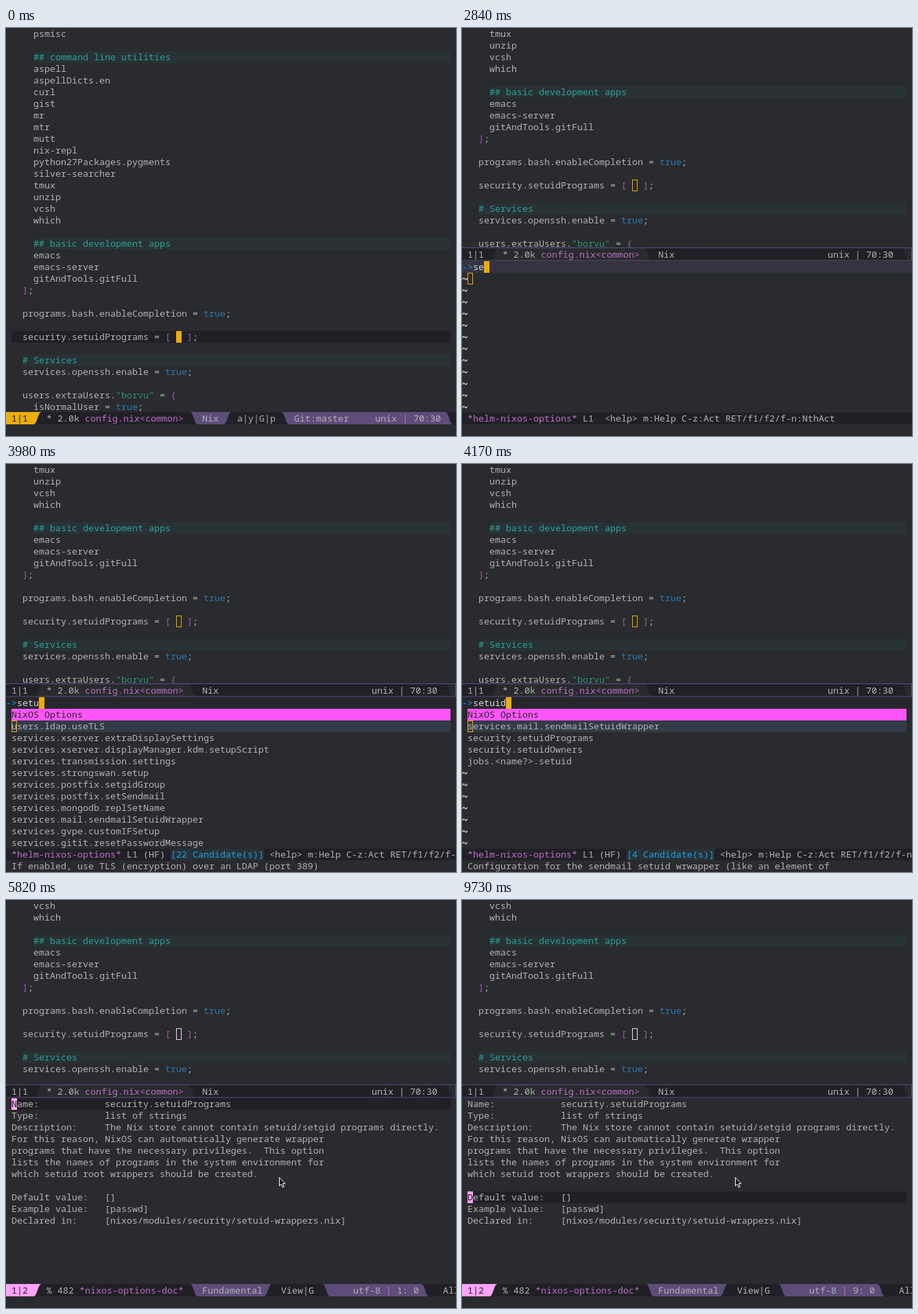
An HTML page that plays this animation: 656x595 px, repeating every 9870 ms.

```html
<!DOCTYPE html>
<html lang="en">
<head>
<meta charset="utf-8">
<title>Editor session</title>
<style>
html, body { margin: 0; width: 100%; height: 100%; overflow: hidden; background: #292b2e; }
svg { display: block; }
text { font: 13.3333px "Noto Sans Mono", "DejaVu Sans Mono", monospace; white-space: pre; }
</style>
</head>
<body>
<svg id="stage" width="656" height="595" viewBox="0 0 656 595"></svg>
<script>
const W = 656, LOOP = 9870, ROW = 17;
const BG = '#292b2e', DARK = '#212026', FG = '#b2b2b2', PURPLE = '#5d4d7a', VIOLET = '#bc6ec5',
  YELLOW = '#eead0e', PINK = '#ffa3fa', TEAL = '#2aa198', BAND = '#293235', BLUE = '#1aa0ea';

const CONFIG = `  psmisc

  ## command line utilities
  aspell
  aspellDicts.en
  curl
  gist
  mr
  mtr
  mutt
  nix-repl
  python27Packages.pygments
  silver-searcher
  tmux
  unzip
  vcsh
  which

  ## basic development apps
  emacs
  emacs-server
  gitAndTools.gitFull
];

programs.bash.enableCompletion = true;

security.setuidPrograms = [   ];

# Services
services.openssh.enable = true;

users.extraUsers."borvu" = {
  isNormalUser = true;`.split('\n');
const CURSOR_LINE = 26;

const SET_LIST = `users.ldap.useTLS
services.xserver.extraDisplaySettings
services.xserver.displayManager.kdm.setupScript
services.transmission.settings
services.strongswan.setup
services.postfix.setgidGroup
services.postfix.setSendmail
services.mongodb.replSetName
services.mail.sendmailSetuidWrapper
services.gvpe.customIFSetup
services.gitit.resetPasswordMessage`.split('\n');
const SETUID_LIST = `services.mail.sendmailSetuidWrapper
security.setuidPrograms
security.setuidOwners
jobs.<name?>.setuid`.split('\n');

const DOC = `Name:            security.setuidPrograms
Type:            list of strings
Description:     The Nix store cannot contain setuid/setgid programs directly.
For this reason, NixOS can automatically generate wrapper
programs that have the necessary privileges.  This option
lists the names of programs in the system environment for
which setuid root wrappers should be created.

Default value:   []
Example value:   [passwd]
Declared in:     [nixos/modules/security/setuid-wrappers.nix]`.split('\n');

// Start times of each change
const KEYS = [[870, 'SPC-'], [1170, 'SPC h-']];
const QUERY = [[2750, 's'], [2800, 'se'], [2860, 'set'], [3940, 'setu'], [3985, 'setui'], [4030, 'setuid']];
const LISTS = [[2920, SET_LIST], [4080, SETUID_LIST]];
const COUNTS = [[2970, 22], [4125, 4]];
const HINTS = [
  [3020, 'If enabled, use TLS (encryption) over an LDAP (port 389)'],
  [4170, 'Configuration for the sendmail setuid wrwapper (like an element of'],
  [4960, 'The Nix store cannot contain setuid/setgid programs directly.']
];
const DOWN = [8120, 8370, 8530, 8740, 8980, 9280, 9520, 9730];

const at = (steps, t, start) => steps.reduce((v, [ms, next]) => t >= ms ? next : v, start);
const esc = s => s.replace(/&/g, '&amp;').replace(/</g, '&lt;').replace(/>/g, '&gt;');
const rect = (x, y, w, h, fill) => `<rect x="${x}" y="${y}" width="${w}" height="${h}" fill="${fill}"/>`;
const text = (x, y, s, fill = FG, bold) =>
  `<text x="${x}" y="${y}" fill="${fill}"${bold ? ' font-weight="700"' : ''} xml:space="preserve">${esc(s)}</text>`;
const hollow = (x, y, color) =>
  `<rect x="${x + .5}" y="${y + .5}" width="7" height="16" fill="none" stroke="${color}"/>`;

// Mode line section between two wavy edges, each given as [top x, bottom x]
function section(y, h, [a, b], [c, d], fill) {
  const m = (a + b) / 2, n = (c + d) / 2, e = y + h;
  return `<path fill="${fill}" d="M${a} ${y}H${c}C${n} ${y} ${n} ${e} ${d} ${e}H${b}C${m} ${e} ${m} ${y} ${a} ${y}"/>`;
}

function codeLine(s, y) {
  const x = 24 + 8 * s.search(/\S|$/), body = s.trim();
  if (body[0] === '#') return rect(x, y, 648 - x, ROW, BAND) + text(x, y + 13, body, TEAL);
  let col = 0;
  return body.split(/("[^"]*"|\btrue\b|[[\]{}])/).map(part => {
    const color = part[0] === '"' ? '#2d9574' : part === 'true' ? '#2a78b0'
      : /^[[\]{}]$/.test(part) ? '#a45bad' : FG;
    const out = part.trim() ? text(x + 8 * col, y + 13, part, color) : '';
    col += part.length;
    return out;
  }).join('');
}

function codeWindow(first, bottom, cursor) {
  const y = (CURSOR_LINE - first) * ROW;
  const rows = CONFIG.slice(first, first + Math.ceil(bottom / ROW));
  return (cursor ? '' : rect(8, y, 640, ROW, DARK))
    + rows.map((s, i) => codeLine(s, i * ROW)).join('')
    + (cursor ? hollow(248, y, cursor) : rect(248, y, 8, ROW, YELLOW));
}

const fileInfo = y => text(59, y, '*') + text(75, y, '2.0k') + text(115, y, 'config.nix<common>', VIOLET, true)
  + text(286, y, 'Nix');

const idleMode = y => rect(0, y, W, 20, DARK)
  + section(y, 20, [53, 42], [266, 277], BG)
  + section(y, 20, [640, 652], [W, W], BG)
  + `<rect x="-.5" y="${y + .5}" width="656" height="18.5" fill="none" stroke="${PURPLE}"/>`
  + text(8, y + 15, '1|1') + fileInfo(y + 15) + text(533, y + 15, 'unix | 70:30');

const activeMode = (badge, color, mid, right, end) => rect(0, 560, W, 18, DARK)
  + section(560, 18, [0, 0], [52, 40], color)
  + section(560, 18, [268, 280], [mid, mid - 12], PURPLE)
  + section(560, 18, [right, right + 12], [end, end + 12], PURPLE)
  + text(8, 574, badge, DARK);

const fullView = echo => codeWindow(0, 561)
  + activeMode('1|1', YELLOW, 329, 401, 640) + fileInfo(574)
  + text(337, 574, 'a|y|G|p') + text(420, 574, 'Git:master')
  + text(538, 574, 'unix') + text(578, 574, '|', '#d070c8') + text(594, 574, '70:30')
  + rect(0, 578, W, 17, BG) + text(8, 591, echo);

const tilde = y =>
  `<path d="M.5 ${y + 10}C2 ${y + 6} 3.5 ${y + 8} 4.2 ${y + 9}S6.5 ${y + 11} 7.5 ${y + 7.5}" fill="none" stroke="#e4e4e4" stroke-width="1.2"/>`;

function helmView(t) {
  const query = at(QUERY, t, ''), list = at(LISTS, t, null), count = at(COUNTS, t, 0);
  const pick = t >= 4920 ? 1 : 0, top = 340;
  let out = codeWindow(13, 320, YELLOW) + rect(0, 320, W, 275, BG) + idleMode(320)
    + rect(0, top, W, ROW, list ? '#26272b' : '#343440')
    + text(0, top + 13, '->', BLUE) + text(16, top + 13, query, '#d8d8d8')
    + rect(16 + 8 * query.length, top, 8, ROW, YELLOW);
  const used = list ? list.length + 1 : 0;
  if (list) {
    const y = 374 + pick * ROW;
    out += rect(8, 357, 640, ROW, '#ff55f8') + text(8, 370, 'NixOS Options', BG, true)
      + rect(8, y, 640, ROW, '#333b49')
      + list.map((s, i) => text(8, 387 + i * ROW, s)).join('') + hollow(8, y, YELLOW);
  } else out += hollow(8, 357, YELLOW);
  for (let i = used; i < 12; i++) out += tilde(357 + i * ROW);

  const label = count ? `[${count} Candidate(s)]` : '';
  const helpX = count ? 248 + 8 * label.length : 208;
  out += rect(0, 561, W, 17, DARK) + text(8, 574, '*helm-nixos-options*', VIOLET, true)
    + text(176, 574, `L${pick + 1}${count ? ' (HF)' : ''}`);
  if (count) out += rect(240, 561, 8 * label.length, 17, BAND) + text(240, 574, label, BLUE, true);
  return out + text(helpX, 574, '<help> m:Help C-z:Act RET/f1/f2/f-n:NthAct') + text(8, 591, at(HINTS, t, ''));
}

const POINTER = '<path d="M398.5 404.5V417L401.3 414.4L403.3 419L405.3 418.1L403.4 413.6H407Z" fill="#111" stroke="#fff"/>';

function docView(t) {
  const line = DOWN.filter(ms => t >= ms).length, y = 289 + line * ROW;
  return codeWindow(15, 269, '#f0d8f0') + rect(0, 269, W, 326, BG) + idleMode(269)
    + rect(8, y, 640, ROW, DARK)
    + DOC.map((s, i) => text(8, 302 + i * ROW, s)).join('')
    + rect(8, y, 8, ROW, PINK) + text(8, y + 13, DOC[line].slice(0, 1), DARK)
    + activeMode('1|2', PINK, 388, 461, 605)
    + text(59, 574, '%') + text(75, 574, '482') + text(107, 574, '*nixos-options-doc*', VIOLET, true)
    + text(286, 574, 'Fundamental') + text(401, 574, 'View|G')
    + text(506, 574, 'utf-8') + text(554, 574, '|', '#d070c8') + text(570, 574, `${line + 1}: 0`)
    + text(637, 574, 'All') + POINTER;
}

function view(t) {
  if (t < 1510) return fullView(at(KEYS, t, ''));
  if (t < 5780) return helmView(t);
  return t < 5820 ? fullView('') : docView(t);
}

const stage = document.getElementById('stage');
let shown = '';
function draw() {
  const next = view(performance.now() % LOOP);
  if (next !== shown) stage.innerHTML = shown = next;
  requestAnimationFrame(draw);
}
draw();
</script>
</body>
</html>
```
